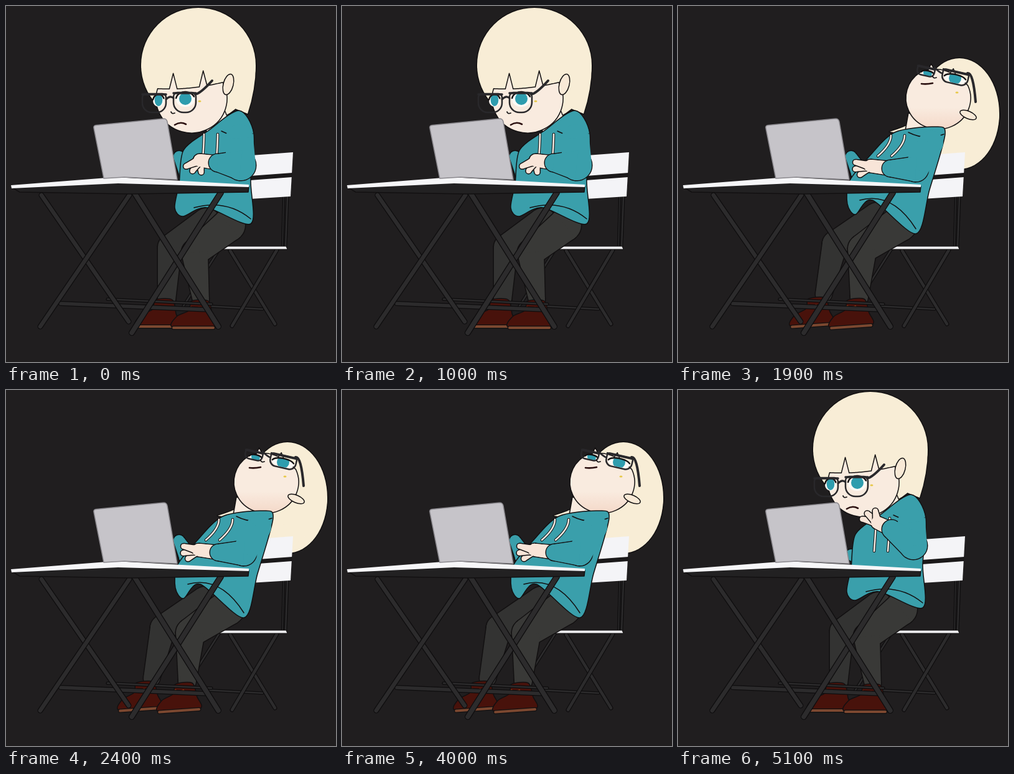
An HTML page with a canvas that plays this animation: 530 by 572 pixels, repeating every 5200 ms.

```html
<!DOCTYPE html>
<html>
<head>
<meta charset="utf-8">
<style>
html, body { margin: 0; height: 100%; overflow: hidden; background: #201e1f; }
canvas { display: block; }
</style>
</head>
<body>
<canvas id="stage" width="530" height="572"></canvas>
<script>
const ctx = document.getElementById('stage').getContext('2d');
const LOOP = 5200, STEP = 100, TYPING = LOOP / 11;
const BACKDROP = '#201e1f', INK = '#121011', HAIR = '#f8edd6', SKIN = '#f9ebdf', TEAL = '#3a9fab', FRAME = '#29282b';
const clamp = x => Math.min(1, Math.max(0, x));
const ease = x => (x = clamp(x), x * x * (3 - 2 * x));
const mix = (a, b, f) => a.map((v, i) => v + (b[i] - v) * f);

// lean: 0 hunched, 1 halfway, 2 leaning back. lift: 0 hand on keys, 1 raised.
let lean = 0, lift = 0;

function pose(hunched, back, halfway = mix(hunched, back, .78)) {
  return lean < 1 ? mix(hunched, halfway, lean) : mix(halfway, back, lean - 1);
}

function paint(path, fill, color, width = 1.5) {
  if (fill) { ctx.fillStyle = fill; ctx.fill(path); }
  if (color) { ctx.strokeStyle = color; ctx.lineWidth = width; ctx.stroke(path); }
}

// Several shapes merged under one outline.
function merge(paths, fill) {
  for (const path of paths) paint(path, null, INK, 3);
  for (const path of paths) paint(path, fill);
}

function oval(x, y, rx, ry = rx, turn = 0, from = 0, to = 7) {
  const path = new Path2D();
  path.ellipse(x, y, rx, ry, turn, from, Math.min(to, from + 2 * Math.PI));
  return path;
}

function poly(...points) {
  const path = new Path2D();
  for (let i = 0; i < points.length; i += 2) path.lineTo(points[i], points[i + 1]);
  path.closePath();
  return path;
}

// Open curve through its first and last point, bent toward the middle one.
function bend(x1, y1, cx, cy, x2, y2) {
  const path = new Path2D();
  path.moveTo(x1, y1);
  path.quadraticCurveTo(cx, cy, x2, y2);
  return path;
}

// Closed smooth curve through all points.
function blob(points) {
  const path = new Path2D(), n = points.length / 2;
  const at = i => [points[(i + n) % n * 2], points[(i + n) % n * 2 + 1]];
  path.moveTo(...at(0));
  for (let i = 0; i < n; i++) {
    const [a, b, c, d] = [-1, 0, 1, 2].map(k => at(i + k));
    path.bezierCurveTo(b[0] + (c[0] - a[0]) / 7, b[1] + (c[1] - a[1]) / 7,
      c[0] - (d[0] - b[0]) / 7, c[1] - (d[1] - b[1]) / 7, ...c);
  }
  return path;
}

// Tapered chain of [x, y, radius] joints.
function chain(...joints) {
  const paths = joints.map(([x, y, r]) => oval(x, y, r));
  for (let i = 1; i < joints.length; i++) {
    const [x1, y1, r1] = joints[i - 1], [x2, y2, r2] = joints[i];
    const length = Math.hypot(x2 - x1, y2 - y1), nx = (y1 - y2) / length, ny = (x2 - x1) / length;
    paths.push(poly(x1 + nx * r1, y1 + ny * r1, x2 + nx * r2, y2 + ny * r2,
      x2 - nx * r2, y2 - ny * r2, x1 - nx * r1, y1 - ny * r1));
  }
  return paths;
}

function bar(width, ...ends) {
  const path = poly(...ends);
  paint(path, null, '#0e0d0e', width);
  paint(path, null, '#2c2b2c', width - 2.5);
}

function drawHair() {
  const [x, y, rx, ry] = pose([309, 95, 92, 92], [452, 173, 64, 89], [402, 106, 81, 87]);
  const [rearX, rearY] = pose([388, 173], [442, 262], [440, 213]);
  const [frontX, frontY] = pose([335, 165], [340, 202], [336, 188]);
  const lock = (side, tipX, tipY) => {
    const path = bend(x + side * rx, y, x + side * rx, (y + tipY) / 2, tipX, tipY);
    path.lineTo(x, y + ry / 2);
    path.lineTo(x, y);
    return path;
  };
  merge([oval(x, y, rx, ry), lock(1, rearX, rearY), lock(-1, frontX, frontY)], HAIR);
}

function drawFace() {
  const [x, y, rx, ry, left, right] = pose(
    [298, 149, 57, 55, 3.44, -.5], [418, 148, 52, 50, 4.1, -.42], [378, 120, 58, 60, 3.68, 0]);
  const [bulge, notch] = pose([-4, 25], [14, 9], [26, 24]);
  const face = oval(x, y, rx, ry, 0, right, left);
  const rim = angle => [x + rx * Math.cos(angle), y + ry * Math.sin(angle)];
  for (let f = 0; f <= 1; f += .02) {
    const [px, py] = mix(rim(left), rim(right), f);
    const parting = Math.max(0, 1 - Math.abs(f - .24) / .06, 1 - Math.abs(f - .7) / .06);
    face.lineTo(px, py - bulge * 4 * f * (1 - f) - notch * parting);
  }
  face.closePath();
  const skin = ctx.createLinearGradient(0, y, 0, y + ry);
  skin.addColorStop(.3, SKIN);
  skin.addColorStop(1, lean > .5 ? '#f4d8c8' : SKIN);
  paint(face, skin, INK);
}

function drawEye(x, y, rx, ry, tilt) {
  const white = oval(x, y, rx, ry, tilt);
  paint(white, '#fdfaf6');
  ctx.save();
  ctx.clip(white);
  paint(oval(x, y - 1, Math.min(10, rx * .7), 10), '#2f9dae');
  ctx.restore();
  paint(oval(x, y, rx, ry, tilt, 3.3, 5.9), null, INK, 2.5);
}

function drawLens(x, y, rx, ry, tilt) {
  const lens = new Path2D(), top = new Path2D();
  lens.roundRect(-rx, -ry, 2 * rx, 2 * ry, [ry * .4, ry * .4, ry, ry]);
  top.moveTo(-rx, 1 - ry);
  top.lineTo(rx, 1 - ry);
  ctx.save();
  ctx.translate(x, y);
  ctx.rotate(tilt);
  paint(lens, null, FRAME, 2.5);
  paint(top, null, FRAME, 3.5);
  ctx.restore();
}

function drawFeatures() {
  const [tilt] = pose([0], [.22], [.06]);
  drawEye(...pose([288, 150, 15, 12], [445, 117, 18, 7], [377, 102, 16, 6]), tilt);
  drawEye(...pose([245, 152, 9, 10], [401, 108, 10, 4], [336, 94, 9, 6]), tilt);

  const near = pose([287, 155, 18, 16], [445, 115, 21, 10], [377, 101, 19, 17]);
  const far = pose([238, 156, 19, 15], [398, 105, 14, 7], [330, 94, 17, 15]);
  const temple = pose([331, 120], [478, 154], [428, 110]);
  const [nx, ny, nrx, nry] = near, [fx, fy, frx] = far;
  drawLens(...near, tilt);
  drawLens(...far, tilt);
  paint(bend(fx + frx, fy - 6, (nx + fx) / 2 + 1, ny - nry + 4, nx - nrx, ny - 7), null, FRAME, 3);
  paint(bend(nx + nrx - 1, ny - nry + 3, nx + nrx + 8, ny - nry + 1, ...temple), null, FRAME, 4);

  const [mx, my, smile] = pose([280, 191, -6], [400, 125, 1], [343, 130, 9]);
  paint(bend(mx - 9, my, mx, my + smile, mx + 9, my - 1), null, '#2a1010', 2.6);
  const [noseX, noseY] = pose([267, 172], [411, 115], [348, 116]);
  paint(bend(noseX - 2, noseY - 2, noseX - 1, noseY + 2, noseX + 4, noseY), null, INK, 1.8);
  paint(oval(...pose([311, 153], [448, 139], [394, 121]), 2.5, 1.5), '#e8c94a');
}

function drawHead() {
  drawHair();
  paint(poly(...pose([318, 190, 350, 165, 358, 184, 326, 212], [370, 172, 408, 180, 404, 206, 364, 206],
    [345, 165, 395, 170, 380, 196, 350, 214])), SKIN, INK);
  drawFace();
  paint(oval(...pose([357, 126, 8, 17, .25], [466, 175, 14, 6, .4], [436, 140, 7, 16, .35])), '#f8e9d6', INK);
  drawFeatures();
}

function drawChair() {
  bar(5, 342, 392, 285, 482);
  bar(5, 320, 482, 412, 487);
  bar(7, 360, 393, 432, 511);
  bar(7, 435, 392, 363, 514);
  bar(4, 446, 306, 444, 387);
  bar(5, 452, 306, 449, 387);
  paint(poly(394, 240, 461, 235, 457, 306, 392, 310), '#f4f4f7');
  paint(poly(392, 273, 460, 268, 459, 275, 392, 280), '#1b191a');
  paint(poly(329, 386, 450, 386, 452, 391, 332, 391), '#eeeef0', INK, 1);
}

function drawShoe(heelX, heelY, tilt) {
  ctx.save();
  ctx.translate(heelX, heelY);
  ctx.rotate(tilt);
  paint(blob([0, 0, -3, -20, -9, -42, -36, -42, -40, -27, -60, -17, -66, 0]), '#48120b', INK);
  const sole = poly(-65, 1, -1, 1);
  paint(sole, null, INK, 6.5);
  paint(sole, null, '#7c4830', 4);
  paint(bend(-37, -32, -30, -28, -24, -31), null, '#b4501c', 3);
  ctx.restore();
}

function drawLegs() {
  merge(chain(pose([322, 347, 22], [320, 338, 22]), pose([263, 387, 19], [252, 382, 20]),
    pose([258, 472, 14], [234, 463, 13])), '#333332');
  drawShoe(...pose([276, 514, 0], [248, 510, -.07]));
  merge(chain(pose([358, 352, 26], [356, 350, 28]), pose([303, 396, 21], [296, 390, 23]),
    pose([313, 472, 13], [291, 468, 14])), '#393937');
  drawShoe(...pose([334, 516, 0], [311, 512, -.07]));
}

function drawTorso() {
  const cuffY = pose([242], [242])[0] + 23 * lift;
  merge(chain([278, cuffY, 9], [292, 268, 14]), TEAL);
  const shape = pose(
    [324, 201, 285, 232, 278, 285, 271, 324, 284, 338, 322, 324, 393, 350, 393, 280, 398, 205, 374, 168],
    [348, 203, 306, 243, 275, 282, 272, 318, 285, 335, 312, 312, 382, 366, 404, 295, 429, 206, 412, 194],
    [338, 192, 303, 238, 276, 282, 272, 318, 283, 337, 312, 315, 383, 364, 402, 295, 416, 200, 404, 181]);
  paint(blob(shape), TEAL, INK);
  const [collarX, collarY, hemX, hemY, backX, backY, hoodX, hoodY] =
    [0, 1, 10, 11, 12, 13, 16, 17].map(i => shape[i]);
  paint(bend(hemX - 20, hemY, hemX + 32, hemY - 14, backX, backY - 8), null, INK);
  paint(bend(collarX + 22, collarY, collarX + 50, collarY + 14, hoodX - 2, hoodY), null, INK);
  for (const gap of [-6, 16]) {
    const [drop, slant] = pose([58, -3], [38, -21], [50, -16]);
    const string = bend(collarX + gap, collarY + 5, collarX + gap, collarY + 20, collarX + gap + slant, collarY + drop);
    paint(string, null, INK, 4.5);
    paint(string, null, '#f4ece4', 2.5);
  }
}

function drawArm() {
  const shoulder = pose([375, 212, 22], [406, 220, 20], [392, 208, 20]);
  const elbow = mix(pose([377, 256, 24], [382, 262, 20]), pose([378, 250, 22], [385, 248, 19], [384, 256, 21]), lift);
  const wrist = mix(pose([340, 252, 14], [341, 261, 13]), pose([343, 224, 15], [343, 234, 12], [341, 228, 15]), lift);
  const [palmX, palmY, aim] = mix(pose([311, 248, 117], [309, 257, 165]),
    pose([320, 213, 230], [312, 226, 185], [316, 213, 228]), lift);
  const fingers = [-1, 0, 1].map(i => {
    const angle = (aim + i * 33) * Math.PI / 180;
    return chain([palmX + 7 * Math.cos(angle), palmY + 5 * Math.sin(angle), 6],
      [palmX + 25 * Math.cos(angle), palmY + 19 * Math.sin(angle), 4]);
  });
  const palm = chain([palmX, palmY, 10], [wrist[0], wrist[1], 11]);
  merge(palm, '#f8e5d8');
  for (const finger of fingers) merge(finger, '#f8e5d8');
  for (const path of palm) paint(path, '#f8e5d8');
  merge(chain(elbow, wrist), TEAL);
  for (const path of chain(shoulder, elbow, wrist)) paint(path, TEAL);
}

function drawTable() {
  bar(5, 163, 471, 330, 479);
  bar(8, 88, 478, 325, 488);
  bar(9, 57, 304, 197, 507);
  bar(9, 198, 304, 55, 515);
  bar(10, 345, 300, 202, 525);
  bar(10, 203, 295, 341, 515);
  paint(poly(9, 291, 180, 284, 390, 290, 389, 299, 200, 302, 22, 299), '#222122', INK);
  paint(poly(8, 288, 175, 275, 390, 287, 390, 291, 180, 285, 9, 293), '#f6f6f8');
}

function drawLaptop() {
  const lid = new Path2D();
  lid.moveTo(157, 277);
  lid.lineTo(141, 196);
  lid.quadraticCurveTo(140, 192, 145, 191.5);
  lid.lineTo(253, 181);
  lid.quadraticCurveTo(258, 181, 259, 186);
  lid.lineTo(275, 279);
  lid.lineTo(190, 275);
  lid.closePath();
  paint(lid, '#c6c4c9', '#8b898e');
}

function draw(time) {
  const back = 1 - (1 - clamp((time - 1200) / 683)) ** 2;
  lean = 2 * back * (1 - ease((time - 4800) / 300));
  lift = ease((time / TYPING % 1 - .45) / .31);
  ctx.fillStyle = BACKDROP;
  ctx.fillRect(0, 0, 530, 572);
  drawHead();
  drawChair();
  drawLegs();
  drawTorso();
  drawArm();
  drawTable();
  drawLaptop();
}

ctx.lineCap = ctx.lineJoin = 'round';
const start = performance.now();
function tick() {
  const time = (performance.now() - start) % LOOP;
  draw(Math.floor(time / STEP) * STEP);
  requestAnimationFrame(tick);
}
tick();
</script>
</body>
</html>
```
